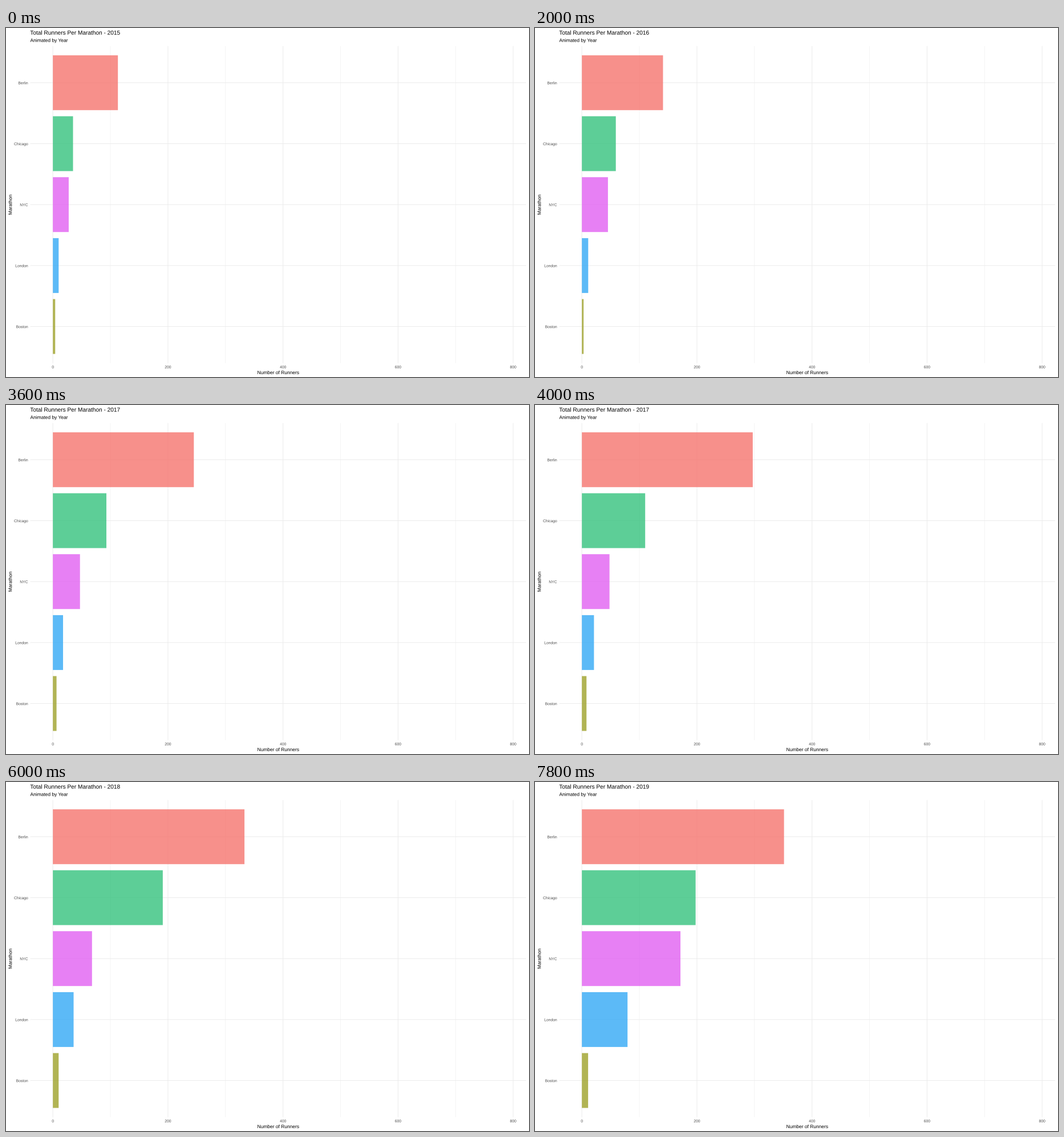
Recreate the animation shown at these times as a matplotlib script. Size 917 by 611 pixels, loop 8 s.

```python
import matplotlib.pyplot as plt
import numpy as np
from matplotlib.animation import FuncAnimation
from matplotlib.patches import PathPatch, Rectangle
from matplotlib.textpath import TextPath
from matplotlib.transforms import Affine2D

W, H, DPI = 917, 611, 64
FRAMES, INTERVAL = 40, 200

# panel geometry in pixels
LEFT, RIGHT, TOP, BOTTOM = 42.5, 912, 31.7, 586.7
ZERO, UNIT = 82.2, 1.00875
ROW0, STEP, BAR = 95.8, 106.7, 96
BASE = 8.42  # base font size

# name, fill, totals at the end of 2015 start, 2016, 2017, 2018, 2019
BARS = [
    ("Berlin", (246, 116, 110), (113, 141, 297, 333, 355)),
    ("Chicago", (52, 194, 125), (35, 59, 110, 191, 199)),
    ("NYC", (225, 96, 242), (27.5, 45.3, 48, 68, 192)),
    ("London", (51, 169, 246), (10, 11, 21, 36, 88)),
    ("Boston", (158, 161, 41), (4, 3, 8, 10, 11)),
]
# each total holds from one key to the next, then moves on linearly
KEYS = (0, 3, 10, 14, 20, 24, 30, 34, 40)

fig = plt.figure(figsize=(W / DPI, H / DPI), dpi=DPI, facecolor="white")
ax = fig.add_axes([0, 0, 1, 1])
ax.set_xlim(0, W)
ax.set_ylim(H, 0)
ax.axis("off")


def text_path(s, x, y, size, align=0, angle=0):
    """Outline of s with its baseline at y; align 0 left, 0.5 centre, 1 right."""
    path = TextPath((0, 0), s, size=size, prop={"family": "Liberation Sans"})
    box = path.get_extents()
    shift = -align * (box.x0 + box.x1)
    move = Affine2D().translate(shift, 0).scale(1, -1).rotate_deg(angle)
    return move.translate(x, y).transform_path(path)


def add_text(*args, color="black", **kw):
    patch = PathPatch(text_path(*args, **kw), fc=color, lw=0, zorder=4)
    return ax.add_patch(patch)


def add_line(xs, ys, px):
    ax.plot(xs, ys, color="#EBEBEB", lw=px * 72 / DPI, snap=False,
            solid_capstyle="butt", zorder=1)


def x_of(value):
    return ZERO + UNIT * value


def total(values, frame):
    stops = np.repeat(values, 2)[:-1]
    return np.interp(frame, KEYS, stops)


for v in range(0, 801, 100):
    major = v % 200 == 0
    add_line([x_of(v)] * 2, [TOP, BOTTOM], 0.95 if major else 0.5)
    if major:
        add_text(str(v), x_of(v), 595.8, BASE * 0.8, 0.5, color="#4D4D4D")

rects = []
for i, (name, rgb, values) in enumerate(BARS):
    y = ROW0 + i * STEP
    add_line([LEFT, RIGHT], [y, y], 0.95)
    add_text(name, 38.8, y + 2.7, BASE * 0.8, 1, color="#4D4D4D")
    rect = Rectangle((ZERO, y - BAR / 2), 0, BAR, fc=np.array(rgb) / 255,
                     alpha=0.8, lw=0, snap=False, zorder=2)
    rects.append(ax.add_patch(rect))

title = add_text("", 0, 0, BASE * 1.2) if False else ax.add_patch(
    PathPatch(text_path("Total", LEFT, 11.6, BASE * 1.2), fc="black", lw=0))
add_text("Animated by Year", LEFT, 24.4, BASE)
add_text("Number of Runners", 477.5, 606, BASE, 0.5)
add_text("Marathon", 10.3, 309.3, BASE, 0.5, angle=-90)


def update(frame):
    year = 2015 + (frame + 2) // 10
    heading = f"Total Runners Per Marathon - {year}"
    title.set_path(text_path(heading, LEFT - 0.2, 11.6, BASE * 1.2))
    for rect, (_, _, values) in zip(rects, BARS):
        rect.set_width(UNIT * total(values, frame))
    return [title, *rects]


anim = FuncAnimation(fig, update, frames=FRAMES, interval=INTERVAL,
                     repeat=True, repeat_delay=0, blit=False)
plt.show()
```
